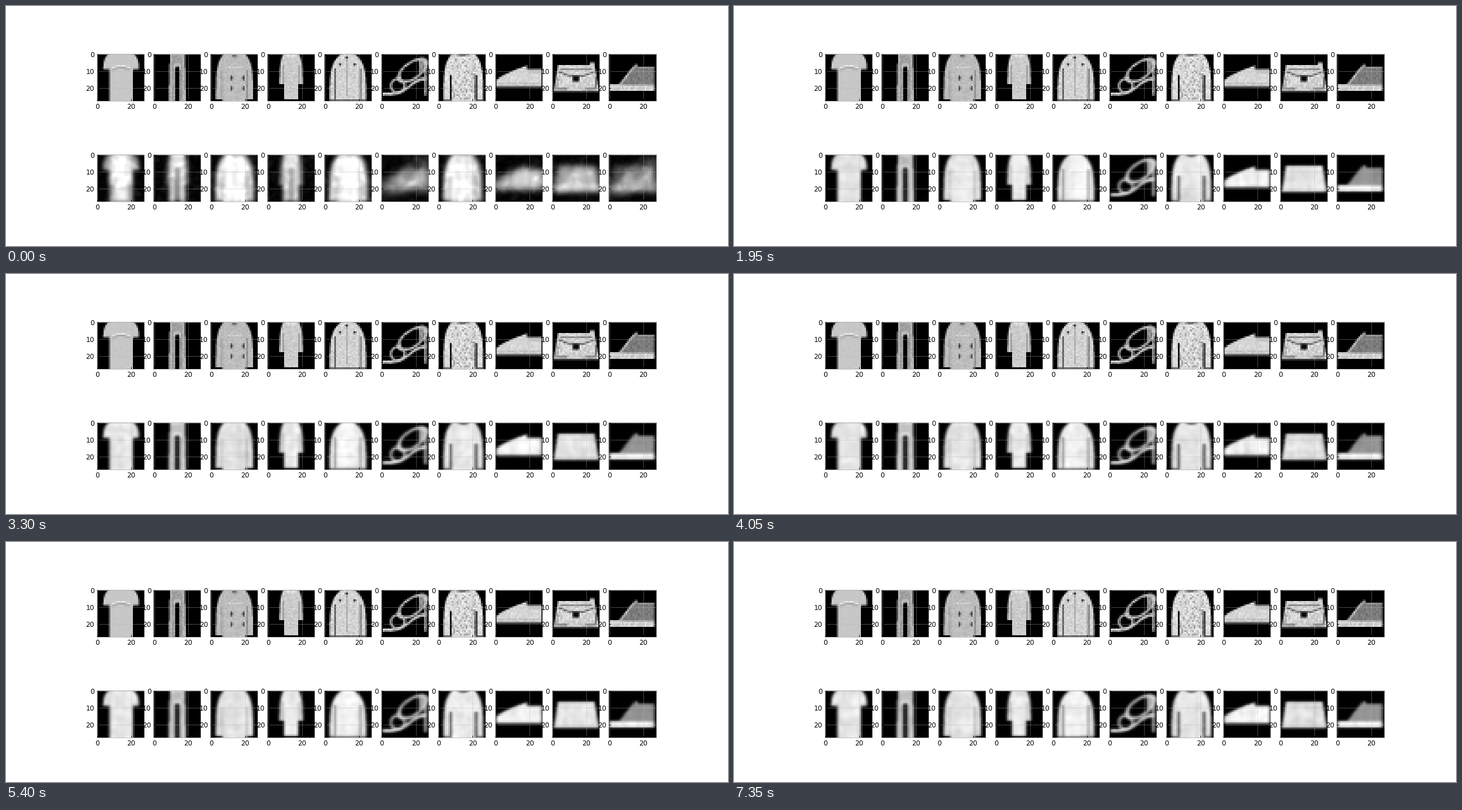
Write a matplotlib script that moves like this. It is 1280x427 px and loops after 7.5 s.

```python
import numpy as np
import matplotlib.pyplot as plt
from matplotlib.animation import FuncAnimation

W, H, DPI = 1280, 427, 1280 / 15
FRAMES, STEP = 50, 150
N, SUB = 28, 4

rng = np.random.default_rng(7)
axis = (np.arange(N * SUB) + 0.5) / SUB
X, Y = np.meshgrid(axis, axis)


def paint(img, value, mask):
    """Blend a supersampled mask into the small image."""
    cover = mask.reshape(N, SUB, N, SUB).mean(axis=(1, 3))
    img += (value - img) * cover


def canvas(value, mask):
    img = np.zeros((N, N))
    paint(img, value, mask)
    return img


def box(x0, x1, y0, y1):
    return (X > x0) & (X < x1) & (Y > y0) & (Y < y1)


def ellipse(cx, cy, rx, ry, tilt=0.0):
    """Normalised radius: 1 on the rim."""
    c, s = np.cos(tilt), np.sin(tilt)
    u, v = X - cx, Y - cy
    return np.hypot((c * u + s * v) / rx, (c * v - s * u) / ry)


def kernel(sigma):
    k = np.arange(N)
    g = np.exp(-((k[:, None] - k) ** 2) / (2 * sigma**2))
    return g / g.sum(axis=1, keepdims=True)


def blur(img, sx, sy):
    return kernel(sy) @ img @ kernel(sx).T


def grain(img, amount):
    return np.clip(img * (1 + rng.normal(0, amount, img.shape)), 0, 1)


# Garments: plain cut, with trim added for the upper row

def shirt(value, cx, neck, wide, drop, arm, under, cuff, hem, seam, width=0.8):
    """Shoulders fall off exponentially; a seam parts sleeve and body."""
    d = abs(X - cx)
    half = neck + (wide - neck) * (1 - np.exp(-Y / drop))
    a = canvas(value, ((d < half) & (Y < cuff)) | ((d < np.minimum(arm, half)) & (Y < hem)))
    paint(a, seam, (abs(d - arm - 0.3) < width / 2) & (Y > under) & (Y < cuff))
    return a


def tee(trim):
    a = shirt(0.78, 14.2, 6.5, 10.5, 2.5, 6.8, 8, 9.5, 28, 0.7)
    if trim:
        arc = 7.4 + 0.06 * (X - 14.2) ** 2
        for shift, tone in ((0, 0.92), (1.2, 0.62)):
            paint(a, tone, (abs(Y - arc - shift) < 0.45) & (abs(X - 14.2) < 5))
        a = grain(a, 0.01)
    return a


def trousers(trim):
    d = abs(X - 14.1)
    legs = (d < 4.1 + 0.02 * Y) & (d > np.clip(0.6 * (Y - 7), 0, 1.3))
    a = canvas(0.62, legs)
    paint(a, 0.8, legs & (abs(d - 2.7) > 0.8) & ((d > 3) | (Y > 6.5)))
    paint(a, 0.8, legs & (Y < 1))
    return grain(a, 0.04) if trim else a


def pullover(trim):
    a = shirt(0.74, 14.2, 5.7, 10.9, 5, 7, 10, 27, 28, 0.58)
    if trim:
        paint(a, 0.3, box(12.8, 15.6, 1.3, 2.2))
        paint(a, 0.82, box(9.5, 18.5, 8.3, 9.1))
        for x in (12.7, 19.3):
            for y in (14.5, 20.5):
                paint(a, 0.06, ellipse(x, y, 0.5, 1.2) < 1)
        a = grain(a, 0.03)
    return a


def coat(trim):
    a = shirt(0.8, 14, 4, 6.7, 4, 4, 7, 18, 27, 0.58, 0.7)
    if trim:
        paint(a, 0.92, (abs(ellipse(14, -0.5, 3.2, 2.5) - 1) < 0.2))
        a = grain(a, 0.03)
    return a


def jacket(trim):
    a = shirt(0.83, 13.9, 3, 10.7, 5, 6.9, 9, 27.5, 25.8, 0.25)
    if trim:
        paint(a, 0.65, box(13.2, 14, 3, 25))
        for x, y in ((9.4, 6.7), (17.8, 6.7), (13.4, 2.5)):
            paint(a, 0.15, ellipse(x, y, 0.8, 0.7) < 1)
        a = grain(a, 0.04)
    return a


def sandal(trim):
    upper = ellipse(18.5, 10, 9.2, 4.6, -0.62)
    a = canvas(0.55, (upper < 1) & (X > 22))
    paint(a, 0.7, abs(upper - 1) < 0.14)
    paint(a, 0.7, abs(ellipse(9.8, 19, 4, 4) - 1) < 0.16)
    sole = 24 - 9.5 / (1 + np.exp((16.5 - X) / 2.8))
    paint(a, 0.78, (abs(Y - sole) < 0.9) & (X > 1) & (X < 26.5))
    paint(a, 0.75, box(25.3, 26.4, 8, 24.8))
    return grain(a, 0.08) if trim else a


def blouse(trim):
    a = shirt(0.86, 14.8, 6, 11.6, 5, 7, 13, 27.6, 28, 0.08, 1.1)
    paint(a, 0, ellipse(14.8, -0.8, 4, 2.2) < 1)
    if trim:
        body = a[:, 8:22]
        body[rng.random(body.shape) < 0.18] *= 0.78
        a = grain(a, 0.05)
    return a


def sneaker(trim):
    ridge = np.where(X < 18.5, 16.5 - 9.2 * (X / 18.5) ** 0.75, 9.6)
    a = canvas(0.84, (Y > ridge) & (Y < 19.5) & (X > 0.7) & (X < 27.2))
    if trim:
        paint(a, 0.7, box(1, 27, 17.5, 18.2))
        paint(a, 0.68, box(19, 26.5, 10.8, 11.5))
        a = grain(a, 0.03)
    return a


def bag(trim):
    d = abs(X - 14.2)
    a = canvas(0.83, (d < 10.6 + 0.17 * (Y - 7)) & (Y > 7) & (Y < 22.2))
    if trim:
        paint(a, 0.8, box(22, 24.7, 5.5, 7))
        flap = 13.7 - 0.4 * np.maximum(d - 3.5, 0)
        paint(a, 0.3, (abs(Y - flap) < 0.4) & (d < 10.4))
        paint(a, 0.45, box(5, 23.5, 9.3, 9.9))
        paint(a, 0.25, (abs(Y - 20.9) < 0.4) & (abs(d - 8.5) < 3.5))
        paint(a, 0.35, (abs(d - 11.2) < 0.35) & (Y > 14) & (Y < 20))
        paint(a, 0.04, box(12.3, 15.7, 13.5, 16.5))
        a = grain(a, 0.06)
    return a


def boot(trim):
    ridge = np.where(X < 17, np.clip(18 - 1.22 * (X - 6.5), 6.8, 18), 8.3)
    upper = (Y > ridge) & (Y < 19) & (X > 1) & (X < 26.8)
    a = canvas(0.48, upper)
    if trim:
        paint(a, 0.78, upper & (Y < ridge + 1.5) & (X < 15.5))
        paint(a, 0.65, upper & (Y < ridge + 0.8))
    paint(a, 0.82, box(0.8, 26.8, 18.4, 22))
    return grain(a, 0.05) if trim else a


def learn(cut):
    """Smooth, brightened copy of a plain cut."""
    gain = min(1.2, 0.87 / cut[cut > 0.3].mean())
    return np.clip(blur(cut * gain, 0.75, 0.6), 0, 1)


ITEMS = (tee, trousers, pullover, coat, jacket, sandal, blouse, sneaker, bag, boot)
tops = [item(True) for item in ITEMS]
lates = [learn(item(False)) for item in ITEMS]

# The first guess confuses each item with its look-alikes
KIN = ((0, 0, 3), (1, 1, 3), (2, 4, 6), (1, 3), (2, 4, 6),
       (5, 7, 9), (2, 4, 6), (7, 7, 9), (8, 8, 9), (9, 5, 8))
earlies = []
for kin in KIN:
    shoe = min(kin) >= 5
    mean = np.mean([lates[k] for k in kin], axis=0)
    earlies.append(blur(mean, 1.5, 1.5) if shoe else blur(1.06 * mean, 0.9, 0.6))


SOFT = kernel(1.2)


def drift(shape):
    """Noise that wanders from frame to frame."""
    z = rng.normal(size=(FRAMES + 2,) + shape)
    return (z[:-2] + 1.3 * z[1:-1] + z[2:]) / 1.92


cols = drift((10, 1, N)) @ SOFT.T
rows = SOFT @ drift((10, N, 1))
blotch = SOFT @ drift((10, N, N)) @ SOFT.T * 2.5
noise = 0.03 * cols + 0.02 * rows + 0.03 * blotch


def guess(j, i):
    early = np.exp(-i / 1.8)
    img = early * earlies[j] + (1 - early) * lates[j]
    haze = 0.05 * early * abs(blotch[i, j])
    return np.clip(img * (1 + noise[i, j] * (1 + early)) + haze, 0, 1)


plt.rcParams.update({
    "font.family": "DejaVu Sans", "font.size": 10,
    "axes.edgecolor": "#bcbcbc", "axes.grid": True, "axes.axisbelow": True,
    "grid.color": "#b2b2b2", "grid.linestyle": "--", "grid.linewidth": 0.5,
    "xtick.direction": "in", "ytick.direction": "in",
})
fig, axes = plt.subplots(2, 10, figsize=(W / DPI, H / DPI), dpi=DPI)
dx, dy = 0.55 / W, 0.65 / H
fig.subplots_adjust(left=0.125 + dx, right=0.9 + dx, bottom=0.11 - dy, top=0.88 - dy)
views = []
for ax, img in zip(axes.flat, tops + earlies):
    views.append(ax.imshow(img, cmap="gray", vmin=0, vmax=1, interpolation="nearest"))
    ax.set_xticks([0, 20])
    ax.set_yticks([0, 10, 20])


def update(i):
    for j, view in enumerate(views[10:]):
        view.set_data(guess(j, i))
    return views[10:]


anim = FuncAnimation(fig, update, frames=FRAMES, interval=STEP, repeat=True, repeat_delay=0)
plt.show()
```
